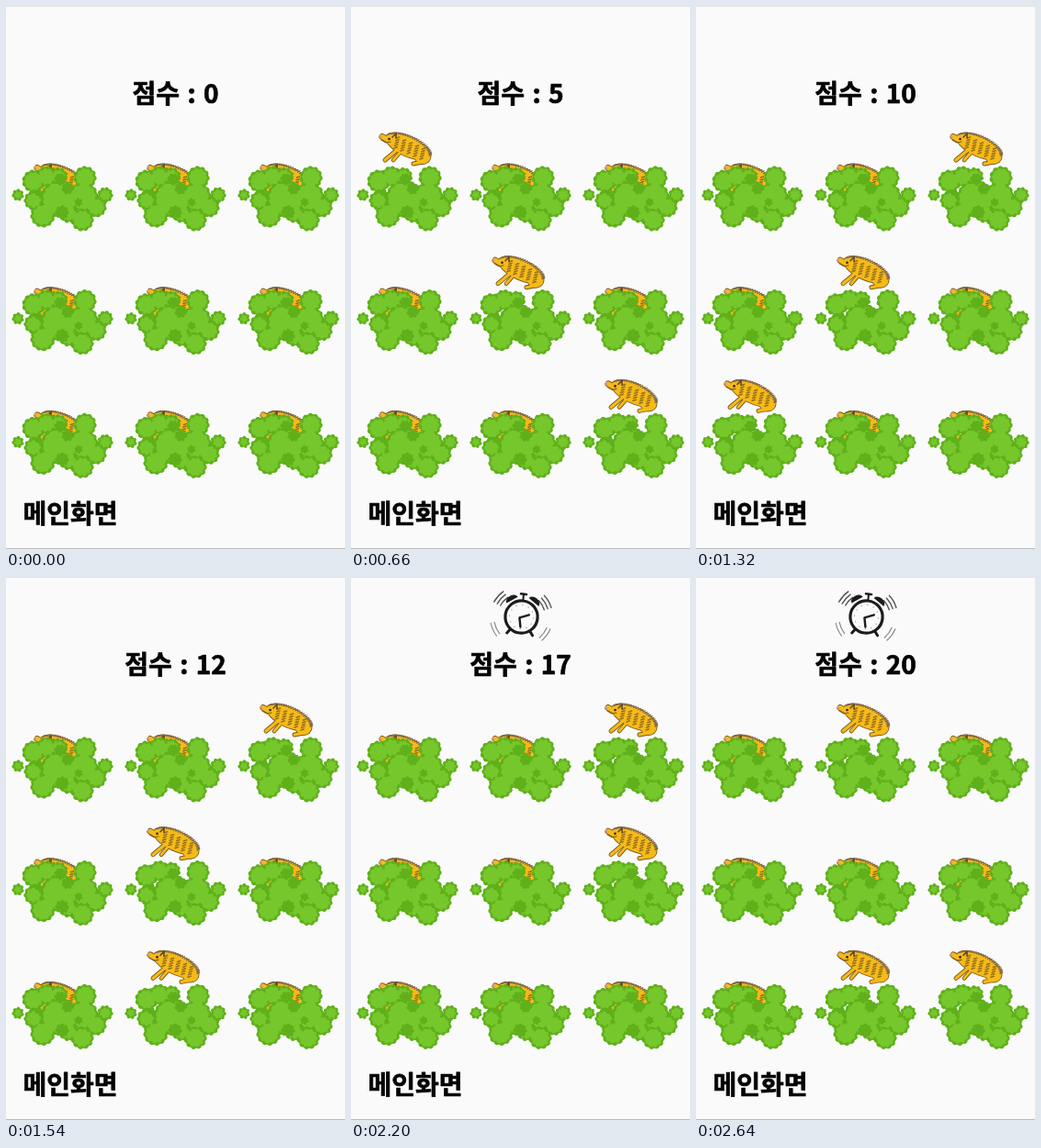
An HTML page with a canvas that plays this animation: 369 by 592 pixels, repeating every 3.24 s.

```html
<!DOCTYPE html>
<html lang="ko">
<head>
<meta charset="utf-8">
<title>점수</title>
<style>
  html, body { margin: 0; width: 100%; height: 100%; overflow: hidden; background: #fafafa; }
  canvas { display: block; }
</style>
</head>
<body>
<canvas id="stage" width="369" height="592"></canvas>
<script>
const ctx = document.getElementById('stage').getContext('2d');
const STEP = 220, LOOP = 3240, RISE = 34;
const FONT = '900 28px "Noto Sans CJK KR", "Noto Sans CJK", sans-serif';
const DARK = '#5fb01a', LIT = '#76c72b', INK = '#1c1c1c';

// Score, raised cells, half-raised cells
const steps = [
  [0, ''], [1, '26', '17'], [3, '12678'], [5, '048'], [6, '135'],
  [8, '235', '1'], [10, '246'], [12, '247'], [13, '157'], [15, '156'],
  [17, '25'], [18, '2'], [20, '178']
];

// Leaf clusters: x, y, radius
const lobes = [
  [13, 206, 6], [30, 191, 12], [44, 186, 11], [57, 186, 9.5], [30, 212, 10],
  [40, 228, 13], [58, 210, 20], [68, 226, 10], [83, 233, 12], [86, 187, 12],
  [84, 208, 16], [98, 219, 11], [108, 206, 8]
];
const shades = [[59, 189, 6], [67, 199, 6], [61, 225, 7], [36, 204, 3.5], [79, 214, 4]];

// Circle with a scalloped, leafy edge
function leafy(path, x, y, r) {
  const bumps = Math.round(r * 0.7) + 3, edge = new Path2D();
  for (let i = 0; i < 72; i++) {
    const a = i * Math.PI / 36;
    const d = r - 0.9 + 1.6 * Math.abs(Math.sin(a * bumps / 2 + x));
    edge.lineTo(x + d * Math.cos(a), y + d * Math.sin(a));
  }
  edge.closePath();
  path.addPath(edge);
}

function cluster(list, inset) {
  const path = new Path2D();
  for (const [x, y, r] of list) leafy(path, x, y, r - inset);
  return path;
}

const leaves = cluster(lobes, 0), bright = cluster(lobes, 2.6), shadow = cluster(shades, 0);

function bush() {
  for (const [path, color] of [[leaves, DARK], [bright, LIT], [shadow, DARK]]) {
    ctx.fillStyle = color;
    ctx.fill(path);
  }
}

function line(color, width, ...p) {
  ctx.strokeStyle = color;
  ctx.lineWidth = width;
  ctx.beginPath();
  for (let i = 0; i < p.length; i += 2) ctx.lineTo(p[i], p[i + 1]);
  ctx.stroke();
}

function oval(x, y, rx, ry, tilt, color) {
  ctx.fillStyle = color;
  ctx.beginPath();
  ctx.ellipse(x, y, rx, ry, tilt, 0, 7);
  ctx.fill();
}

const dot = (x, y, r, color) => oval(x, y, r, r, 0, color);

// One pass for the outline, one slightly thinner for the hide
function hide(color, inset) {
  line(color, 5 - inset * 2, 50, 157, 43, 163, 37, 168);
  line(color, 4.6 - inset * 2, 53, 160, 46, 168);
  line(color, 5 - inset * 2, 78, 170, 68, 172);
  line(color, 7 - inset * 2, 42, 147, 34, 142.5);
  oval(62, 153, 27 - inset, 11.5 - inset, 0.43, color);
  oval(78, 164, 9.5 - inset, 9 - inset, 0, color);
}

function boar() {
  hide('#7a5a1c', 0);
  hide('#f6ba18', 0.9);
  // Bristles along the back
  for (let i = 0; i < 26; i++) {
    const a = 3.5 + i * 0.105;
    const u = 26 * Math.cos(a), v = 10.8 * Math.sin(a);
    const x = 62 + u * 0.91 - v * 0.42, y = 153 + u * 0.42 + v * 0.91;
    line('#80684a', 1.3, x - 1, y + 0.8, x + 1.6, y - 0.4);
  }
  // Broken stripes
  for (let i = 0; i < 5; i++) {
    for (let j = 0; j < 5; j++) {
      const x = 51 + i * 7 - j * 0.6, y = 143.5 + i * 3 + j * 2.7;
      line('#94701a', 1.6, x - 1.6, y + 0.6, x + 1.6, y - 0.5);
    }
  }
  line('#7a5a1c', 1.1, 33, 146, 38, 149, 43, 148);
  line('#5f4a2a', 1.6, 45, 143, 49, 139, 49, 144);
  line('#e0a080', 1.8, 32, 141, 33, 143.5);
  dot(41.5, 145, 1.3, '#2c2010');
}

function arc(r, from, to, color, width) {
  ctx.strokeStyle = color;
  ctx.lineWidth = width;
  ctx.beginPath();
  ctx.arc(0, 0, r, from, to);
  ctx.stroke();
}

function clock() {
  ctx.save();
  ctx.translate(185.5, 43.5);
  ctx.rotate(0.1);
  for (const side of [-1, 1]) {
    ctx.save();
    ctx.scale(side, 1);
    line(INK, 3, 11, 15, 14, 19);
    for (const r of [26, 30, 34]) {
      arc(r, -0.85, -0.4, '#555', 1.4);
      if (r > 26) arc(r, 0.3, 0.75, '#888', 1.2);
    }
    ctx.rotate(0.6);
    ctx.fillStyle = INK;
    ctx.beginPath();
    ctx.ellipse(0, -21, 7, 5, 0, Math.PI, 0);
    ctx.fill();
    ctx.restore();
  }
  line(INK, 2, 0, -18, 0, -24);
  line(INK, 2.6, -3, -25, 3, -25);
  arc(17.6, 0, 7, INK, 3.2);
  for (let i = 0; i < 12; i++) {
    const a = i * Math.PI / 6;
    dot(13 * Math.cos(a), 13 * Math.sin(a), 0.6, '#888');
  }
  line(INK, 2.4, 8, -3, -2, 1, 0, 11);
  ctx.restore();
}

function label(text, x, y, align) {
  ctx.fillStyle = ctx.strokeStyle = '#050505';
  ctx.lineWidth = 0.7;
  ctx.textAlign = align;
  ctx.fillText(text, x, y);
  ctx.strokeText(text, x, y);
}

function draw(ms) {
  const n = Math.min(Math.floor(ms % LOOP / STEP), steps.length - 1);
  const [score, up, half = ''] = steps[n];
  ctx.fillStyle = '#fafafa';
  ctx.fillRect(0, 0, 369, 592);
  ctx.fillStyle = '#e4e4e4';
  ctx.fillRect(0, 0, 369, 1);
  ctx.fillStyle = '#b9b9b9';
  ctx.fillRect(0, 591, 369, 1);
  ctx.lineCap = ctx.lineJoin = 'round';

  for (let cell = 0; cell < 9; cell++) {
    const lift = up.includes(cell) ? 1 : half.includes(cell) ? 0.55 : 0;
    ctx.save();
    ctx.translate(cell % 3 * 123, Math.floor(cell / 3) * 134.7);
    ctx.save();
    ctx.translate(0, RISE * (1 - lift));
    boar();
    ctx.restore();
    bush();
    ctx.restore();
  }

  if (n >= 10) clock();
  ctx.font = FONT;
  ctx.wordSpacing = '2px';
  label('점수 : ' + score, 184.5, 105.5, 'center');
  label('메인화면', 18.5, 564, 'left');
}

const start = performance.now();
function tick() {
  draw(performance.now() - start);
  requestAnimationFrame(tick);
}
tick();
</script>
</body>
</html>
```
